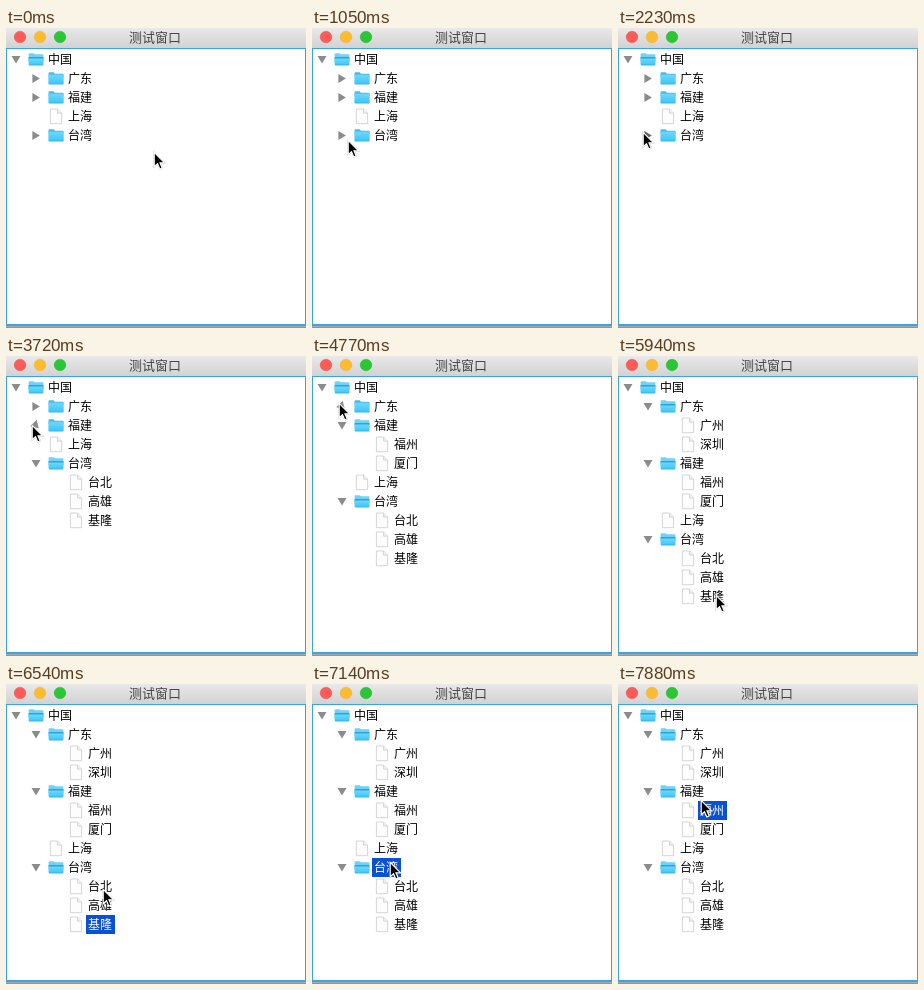
Write an HTML page that moves like this. It is 300 px wide and 300 px high and loops after 8000 ms.

```html
<!DOCTYPE html>
<html lang="zh-CN">
<head>
<meta charset="utf-8">
<title>测试窗口</title>
<style>
  html, body { margin: 0; width: 100%; height: 100%; overflow: hidden; background: #fff; }
  svg { display: block; width: 300px; height: 300px; }
  text { font: 12px "Noto Sans CJK SC", "Noto Sans CJK", sans-serif; fill: #000; }
  .title { font-size: 13px; fill: #444; text-anchor: middle; }
  .selected { fill: #fff; }
  #cursor { filter: drop-shadow(0 .8px .7px rgba(0, 0, 0, .4)); }
</style>
</head>
<body>
<svg viewBox="0 0 300 300">
  <defs>
    <linearGradient id="bar" x2="0" y2="1">
      <stop stop-color="#e9e9e9"/><stop offset="1" stop-color="#d2d2d2"/>
    </linearGradient>
    <linearGradient id="shade" x2="0" y2="1">
      <stop stop-color="#b4b4b4"/><stop offset="1" stop-color="#8a8a8a"/>
    </linearGradient>
    <linearGradient id="front" x2="0" y2="1">
      <stop stop-color="#6fd7fc"/><stop offset="1" stop-color="#3cc5f8"/>
    </linearGradient>
    <g id="closed">
      <path d="M.5 1.2Q.5.3 1.4.3H5.6L7 1.8H14.8Q15.6 1.8 15.6 2.6V5H.5Z" fill="#4dbbe9"/>
      <rect x=".4" y="2.8" width="15.3" height="9.4" rx=".8" fill="url(#front)"/>
      <path d="M.8 12H15.3" stroke="#35afe2" stroke-width=".7"/>
    </g>
    <g id="open">
      <path d="M.6 1.2Q.6.3 1.5.3H5.6L7 1.3H14.6Q15.4 1.3 15.4 2.1V8H.6Z" fill="#6fd2f7"/>
      <rect x=".6" y="4" width="14.8" height="2" fill="#2aa5da"/>
      <path d="M.3 5.6H15.8L15.4 11.5Q15.3 12.2 14.6 12.2H1.5Q.8 12.2.7 11.5Z" fill="url(#front)"/>
      <path d="M1 12H15.1" stroke="#35afe2" stroke-width=".7"/>
    </g>
    <g id="doc" fill="#fdfdfd" stroke="#cbcbcb" stroke-width=".8">
      <path d="M2.4.5H9.6L13.6 4.6V15.2H2.4Z"/>
      <path d="M9.6.5V4.6H13.6" fill="#f1f1f1"/>
    </g>
    <path id="arrow" d="M-3.6-4.5L3.9 0L-3.6 4.5Z"/>
  </defs>

  <rect width="300" height="300" fill="#fff"/>
  <rect width="300" height="20" fill="url(#bar)"/>
  <g stroke-width=".5">
    <circle cx="14" cy="9" r="5.8" fill="#fc5b57" stroke="#ee514c"/>
    <circle cx="34" cy="9" r="5.8" fill="#fdbc30" stroke="#efae2a"/>
    <circle cx="54" cy="9" r="5.8" fill="#2ac636" stroke="#24b930"/>
  </g>
  <text class="title" x="149" y="14">测试窗口</text>
  <rect y="298" width="300" height="2" fill="url(#shade)"/>
  <rect x=".5" y="20.5" width="299" height="277" fill="#fff" stroke="#3aa2e9"/>
  <rect y="296" width="300" height="1" fill="#3aa2e9"/>

  <g id="tree"></g>
  <path id="cursor" d="M.2.4V14.8L3.5 11.7L5.8 17L8.2 16L6 10.8H10.6Z"
        fill="#000" stroke="#fff" stroke-width="1.2"/>
</svg>
<script>
const LOOP = 8000, TICK = 148.4; // the picture is refreshed once per tick
const ROW = 19, TOP = 31.5, INDENT = 20;

const places = [
  ['广东', ['广州', '深圳']],
  ['福建', ['福州', '厦门']],
  ['上海'],
  ['台湾', ['台北', '高雄', '基隆']]
];

// pointer strokes between clicks, timed in ticks
const home = { x: 148, y: 124 };
const strokes = [
  { from: 2, to: 7, x: 36, y: 112, bend: -80 },
  { from: 8, to: 12, x: 25, y: 104 },
  { from: 19, to: 23, x: 26, y: 69 },
  { from: 27, to: 31, x: 27, y: 47 },
  { from: 33, to: 36, x: 114, y: 196 },
  { from: 36, to: 39, x: 98, y: 239 },
  { from: 42, to: 44, x: 97, y: 205 },
  { from: 44, to: 47, x: 78, y: 178 },
  { from: 48, to: 51, x: 83, y: 116 }
];

const opens = { 台湾: 17, 福建: 26, 广东: 33 };
const picks = { 基隆: 42, 台湾: 47, 福州: 53 };

const smooth = k => k * k * (3 - 2 * k);
const mix = (a, b, k) => a + (b - a) * k;

function pointer(tick) {
  let { x, y } = home;
  for (const s of strokes) {
    if (tick <= s.from) break;
    const k = smooth(Math.min(1, (tick - s.from) / (s.to - s.from)));
    x = mix(x, s.x, k);
    y = mix(y, s.y, k) + 2 * k * (1 - k) * (s.bend || 0);
  }
  return [x, y];
}

function arrow(x, y, angle, color = '#8b8b8b') {
  return `<use href="#arrow" fill="${color}" transform="translate(${x} ${y}) rotate(${angle})"/>`;
}

// pressed two ticks before opening, half turned one tick before
function branchArrow(y, wait) {
  const angle = wait <= 0 ? 90 : wait === 1 ? 45 : 0;
  return arrow(30, y, angle, wait === 2 ? '#666' : undefined);
}

function label(name, x, y, selected) {
  const box = selected
    ? `<rect x="${x - 2}" y="${y - 9.5}" width="29" height="19" fill="#0a50d2"/>` : '';
  return `${box}<text x="${x}" y="${y + 4.5}"${selected ? ' class="selected"' : ''}>${name}</text>`;
}

function drawTree(tick) {
  const picked = Object.keys(picks).findLast(name => tick >= picks[name]);
  const parts = [];
  let row = 0;

  function add(name, depth, icon) {
    const x = 22 + depth * INDENT, y = TOP + ROW * row++;
    const lift = icon === 'doc' ? 8 : 6.5;
    parts.push(`<use href="#${icon}" x="${x}" y="${y - lift}"/>`,
      label(name, x + 20, y, name === picked));
    return y;
  }

  const rootY = add('中国', 0, 'open');
  parts.push(arrow(10, rootY, 90));
  for (const [name, cities] of places) {
    if (!cities) {
      add(name, 1, 'doc');
      continue;
    }
    const wait = opens[name] - tick;
    const y = add(name, 1, wait <= 0 ? 'open' : 'closed');
    parts.push(branchArrow(y, wait));
    if (wait <= 0) cities.forEach(city => add(city, 2, 'doc'));
  }
  return parts.join('');
}

const tree = document.getElementById('tree');
const cursor = document.getElementById('cursor');
const start = performance.now();
let shown = -1;

function frame() {
  const tick = Math.floor((performance.now() - start) % LOOP / TICK);
  if (tick !== shown) {
    shown = tick;
    tree.innerHTML = drawTree(tick);
    cursor.setAttribute('transform', `translate(${pointer(tick).map(Math.round)})`);
  }
  requestAnimationFrame(frame);
}
frame();
</script>
</body>
</html>
```
